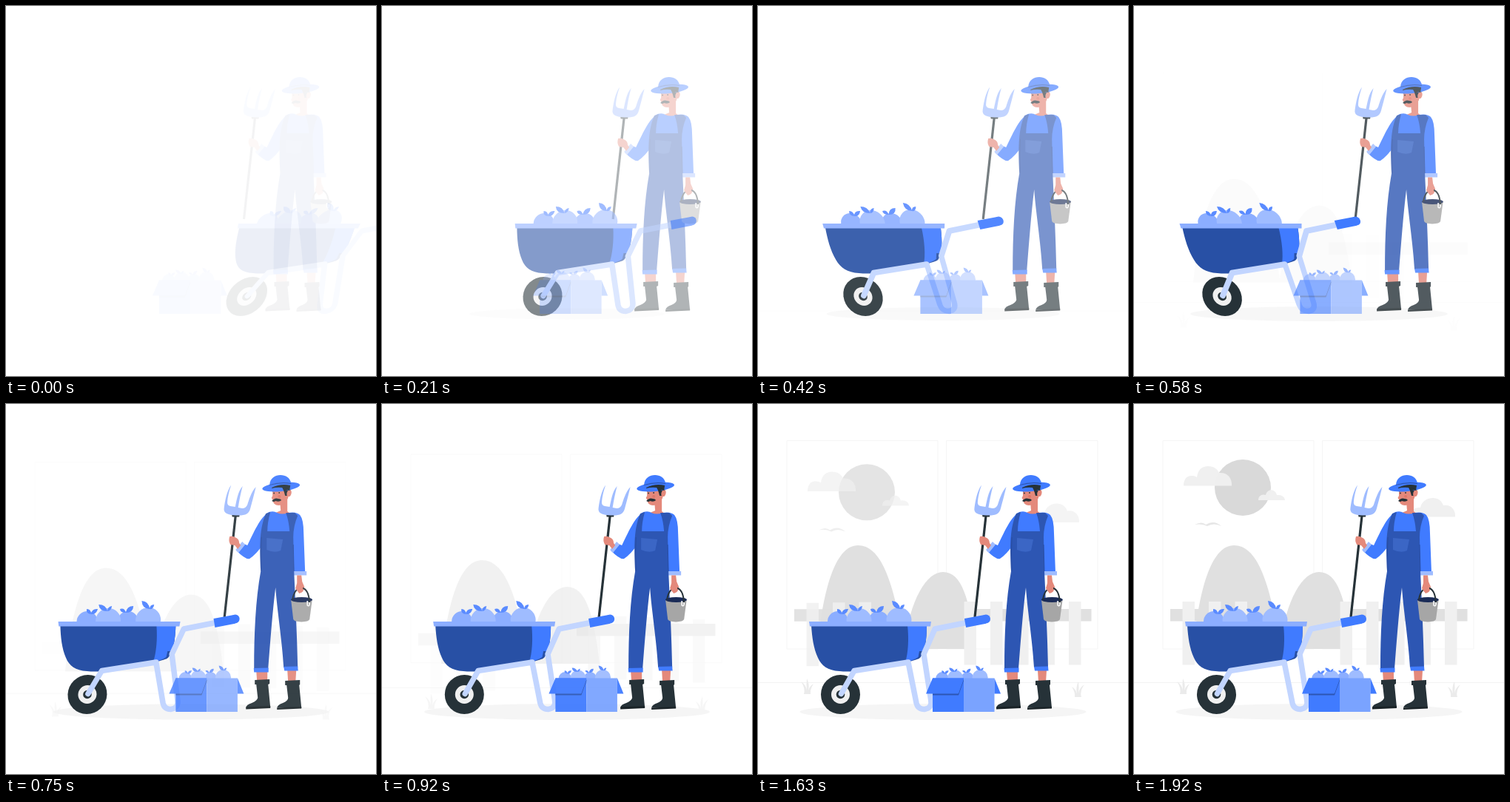
An HTML page for the animation above (2000 ms loop, 500 px wide and 500 px high).

```html
<!DOCTYPE html>
<html lang="en">
<head>
<meta charset="utf-8">
<title>Farmer with wheelbarrow</title>
<style>
  html, body { margin: 0; width: 100%; height: 100%; overflow: hidden; background: #fff; }
  svg { display: block; width: 100vw; height: 100vh; }
  .blue { fill: #407bff; }
  .denim { fill: #2d56b3; }
  .pale { fill: #9fbcff; }
  .dark { fill: #263238; }
  .skin { fill: #e4897b; }
  .hill { fill: #e0e0e0; }
  .mist { fill: #f0f0f0; }
  .line { fill: none; }
</style>
</head>
<body>
<svg viewBox="0 0 500 500">
  <defs>
    <g id="fruit">
      <circle cx="108" cy="294" r="14" fill="#8caeff"/>
      <circle cx="163" cy="294" r="14" fill="#8caeff"/>
      <circle class="pale" cx="136.500" cy="293" r="17"/>
      <circle class="pale" cx="190.500" cy="292" r="17"/>
      <path fill="#5a8bff" d="M113 284Q106 283 107 277Q113 277 113 284Q114 276 122 277Q120 285 113 284
        M135 280Q124 280 123 271Q133 271 135 280Q135 274 141 273Q140 280 135 280
        M160 282Q152 282 152 277Q158 275 160 282Q161 273 170 273Q170 282 160 282
        M192 277Q182 277 181 266Q191 267 192 277Q192 271 198 271Q197 278 192 277"/>
    </g>
  </defs>

  <g data-up=".5"><path class="line" stroke="#f5f5f5" d="M39 49.500H243V331H39ZM254.500 49.500H459V331H254.500Z"/></g>
  <g data-up=".26"><path class="line" stroke="#f2f2f2" d="M0 376.500H500"/></g>

  <g data-up=".95"><circle cx="147" cy="113" r="38" fill="#d9d9d9"/></g>
  <g data-up=".98" class="mist">
    <path d="M67 110.500C67 101 72 96 79 97Q83 97 85 99C86 89 92 84 100 84C108 84 113 88 115 93C126 92 133 100 132 110.500Z"/>
    <path d="M168 130C168 124 173 121 178 123C180 114 191 114 193 123C199 122 204 125 204 130Z"/>
    <path d="M372 152.500C374 143 380 139 387 140C389 131 396 127 404 127C411 127 416 131 418 137C428 135 435 143 434 152.500Z"/>
    <path fill="#e6e6e6" d="M82 163Q92 158 97 163Q108 156 118 165Q108 160 99 165Q92 161 82 163Z"/>
  </g>

  <g data-up=".52" class="hill">
    <path d="M80 331C88 245 106 191 135 191C165 191 183 235 198 331Z"/>
    <path d="M196 331C206 262 228 227 250 227C275 227 286 262 294 331Z"/>
  </g>
  <g data-up=".52"><path class="hill" d="M263 277H450.500V293.500H263Z"/></g>
  <g data-up=".72"><path class="hill" d="M49 277H200V293.500H49Z"/></g>
  <g id="posts"></g>

  <g data-up=".52" fill="#ebebeb">
    <path id="grass" d="M62 392C64 386 61 379 58 375Q65 380 66 387Q65 378 66 371Q70 379 68 387Q70 381 75 378Q70 386 71 392Z"/>
    <use href="#grass" transform="translate(499 4) scale(-1 1)"/>
  </g>

  <g id="shade"><ellipse cx="250" cy="416" rx="193.500" ry="11" fill="#f5f5f5"/></g>

  <g id="farmer">
    <!-- boots and ankles -->
    <path class="skin" d="M336 361H351V375H337ZM378 360H390L389 376H379Z"/>
    <path class="dark" d="M334 373L354 372V378L352 379L355 410H322Q323 406 330 404Q337 401 338 397L336 379H334Z
      M375 374L395 373V379L394 380L397 410.500H364Q365 406 372 404Q379 401 379 397L377 380H375Z"/>
    <path d="M322 409.500L355 408V411L322 412.500ZM364 410.500L397 409V411.500L364 413Z" fill="#1a2327"/>

    <!-- neck and shirt -->
    <path class="skin" d="M368 132L378 122V145L383 149Q372 153 362 147L369 144Z"/>
    <path class="blue" d="M353 146Q360 144 364 147Q371 150 379 147Q390 145 395 150Q400 156 400 175L402 228H385L384 190L345 190Q336 203 327 209Q322 211 309 198L317 188L324 191C332 175 341 153 353 146Z"/>
    <path class="pale" d="M308 197L317 186L321 190L312 201ZM384.500 226H404V231.500H385Z"/>

    <!-- overalls -->
    <path class="denim" d="M349 148L355 146Q351 160 351 172H381Q380 158 376 147L388 147L392 151Q386 165 386 180L387 226C389 270 391 312 392 356H373C371 320 364 278 362 248C358 280 355 320 352 358H333C333 310 335 265 342 226C341 200 339 170 349 148Z"/>
    <path d="M350 181L372 183L369 198Q361 202 350 197Z" fill="#3b66c5"/>
    <path d="M343 180Q342 203 343 226M386 190L387 226" class="line" stroke="#264a9c" stroke-width=".8"/>
    <path class="blue" d="M332.500 357L352.500 356.500V362.500H333ZM373 355L392 354.500L392.500 360.500H374Z"/>

    <!-- head -->
    <path class="skin" d="M358 110V124L356.500 127L358 129Q359 137 366 137Q374 137 379 127L382 110Z"/>
    <path class="dark" d="M356 109Q370 104 383 107C384 113 382 119 379 124L375 124Q374 118 371 113Q364 112 357 114Z"/>
    <ellipse class="skin" cx="380.500" cy="120.500" rx="3" ry="4.500" transform="rotate(15 380 120)"/>
    <path class="dark" d="M357 131Q361 126 366 128Q369 128 370 130Q367 133 362 131Q360 133 357 131Z"/>
    <g class="dark"><circle cx="360" cy="120.500" r=".9"/><circle cx="367" cy="120" r=".9"/></g>
    <path class="line" stroke="#263238" stroke-width=".8" d="M358 118L361 117.500M365 117L369 117"/>
    <circle cx="367" cy="125" r="2" fill="#dd6d5e" opacity=".6"/>
    <ellipse class="blue" cx="369.500" cy="112" rx="25.500" ry="6" transform="rotate(-6 369.500 112)"/>
    <path class="dark" d="M357 113Q369 107 382 110L381 117Q377 115 374 119L371 113Q364 112 357 114Z"/>
    <path class="blue" d="M354 109C355 92 381 92 383 107Q369 105 354 109Z"/>
    <path class="line" stroke="#2d56b3" stroke-width="1.200" d="M354 109.500Q369 105 383 107.500"/>

    <!-- pail -->
    <path class="skin" d="M391 231.500H397L398 240L401 247Q401 254 394 256L389 249L391 242Z"/>
    <path d="M383 265H411.500L408 291Q407 294 397 294.500Q387 294 386 291Z" fill="#a6a6a6"/>
    <ellipse cx="397.300" cy="264.500" rx="14.500" ry="3.500" fill="#1a2b57"/>
    <path class="line" stroke="#263238" stroke-width="2" d="M385 264C387 253 392 248 397 248.500C403 249 407 255 408 268"/>
    <path class="line" stroke="#fff" stroke-width="1.500" d="M405 266V272Q407 274 408 271V268"/>
    <path class="skin" d="M390 246H399V253Q395 257 390 251Z"/>

    <!-- pitchfork -->
    <path class="line" stroke="#263238" stroke-width="3.200" d="M308 151L293 288"/>
    <path class="dark" d="M303 149H313.500L313 152.500H303.500Z"/>
    <path class="pale" d="M302 109.500C296 118 294 130 292.500 140C291 148 298 150 309 150.500C321 151 326 149 328 141C331 130 333 122 335.500 112C329 119 326 130 324 136Q322 141 317 141L311.500 140C313 130 315 120 317.500 111C311 118 309 132 307.500 139L301 138Q296 137 297 131C298 122 300 116 302 109.500Z"/>
    <path class="skin" d="M300 179Q304 178 307 180Q313 182 313 188L315 191L311 196L307 191L301 190Q298 185 300 179Z"/>
  </g>

  <g id="barrow">
    <use href="#fruit"/>
    <path d="M72 299H228C228 318 226 335 219 343C208 350 170 353 132 361Q120 362 110 361C94 360 86 354 81 343C75 330 73 315 72 299Z" fill="#2850a5"/>
    <path class="blue" d="M202 299H228C228 318 226 331 221 338Q216 345 199 349C203 336 204 318 202 299Z"/>
    <path d="M218 334L223 334Q220 342 216 345Z" fill="#2850a5"/>
    <path d="M69 294H234L233 300.500H70Z" fill="#8caeff"/>
    <circle class="dark" cx="111.500" cy="392.500" r="26.500"/>
    <circle cx="111.500" cy="392.500" r="12.500" fill="#f0f0f0"/>
    <circle class="dark" cx="111.500" cy="392.500" r="5.800"/>
    <path class="line" stroke="#c2d5ff" stroke-width="7.500" stroke-linejoin="round" stroke-linecap="round" d="M112.500 391.500L130 360.500L203 349L214 404Q216 412.500 225 412.500Q236 411 233.500 399L224 338L239 304L284 295"/>
    <path class="line" stroke="#407bff" stroke-width="12" d="M280 296L307 290.800"/>
    <circle class="blue" cx="308" cy="290.500" r="6"/>
  </g>

  <g id="crate">
    <use href="#fruit" transform="translate(182 188.500) scale(.62)"/>
    <path class="blue" d="M236 370.500H278V416H236Z"/>
    <path d="M278 370.500H319.500V416H278Z" fill="#7aa3ff"/>
    <path class="denim" d="M236 391H271L278 372V374L271 393.500H236Z"/>
    <path class="blue" d="M236 370.500H278L270.500 391.500H227ZM319.500 370.500L328 391.500H319.500Z"/>
  </g>
</svg>
<script>
const $ = id => document.getElementById(id);

// x, start time in seconds
const posts = [[65.5, .8], [101, .78], [136.5, .75], [278.5, .5], [314, .52], [349, .54], [384.5, .56], [420, .59]];
$('posts').innerHTML = posts.map(([x, at]) =>
  `<g data-up="${at}"><path class="mist" d="M${x} 267h16.5v85.500h-16.500Z"/></g>`).join('');
const risers = [...document.querySelectorAll('[data-up]')];

const clamp = x => Math.min(1, Math.max(0, x));

// cubic-bezier(0, 0, .58, 1)
function easeOut(x) {
  let lo = 0, hi = 1;
  for (let i = 0; i < 20; i++) {
    const s = (lo + hi) / 2;
    if (1.74 * (1 - s) * s * s + s ** 3 < x) lo = s; else hi = s;
  }
  return lo * lo * (3 - 2 * lo);
}

const ease = (t, start, end) => easeOut(clamp((t - start) / (end - start)));

function pose(el, transform, opacity) {
  el.setAttribute('transform', transform);
  el.setAttribute('opacity', opacity);
}

function draw(t) {
  const slide = ease(t, 0, 1), linear = clamp(t);
  pose($('farmer'), `translate(${30 * (1 - slide)} 0)`, slide);
  pose($('crate'), `translate(${-30 * (1 - linear)} 0)`, linear);
  pose($('shade'), `translate(250 416) scale(${.5 + slide / 2}) translate(-250 -416)`, slide);

  // the barrow rushes in, leans over and settles
  const rush = ease(t, 0, .6);
  const skew = -20 + 30 * rush - 12 * ease(t, .6, .8) + 2 * ease(t, .8, 1);
  pose($('barrow'), `translate(${250 * (1 - rush)} 343) skewX(${skew}) translate(0 -343)`, rush);

  for (const el of risers) {
    const start = +el.dataset.up;
    pose(el, `translate(0 ${50 * (1 - ease(t, start, start + 1))})`, clamp(t - start));
  }
}

// 24 steps per second
function tick() {
  const step = Math.floor((performance.now() % 2000 + 5) * 24 / 1000) % 48;
  draw(step / 24 + .03);
  requestAnimationFrame(tick);
}
tick();
</script>
</body>
</html>
```
